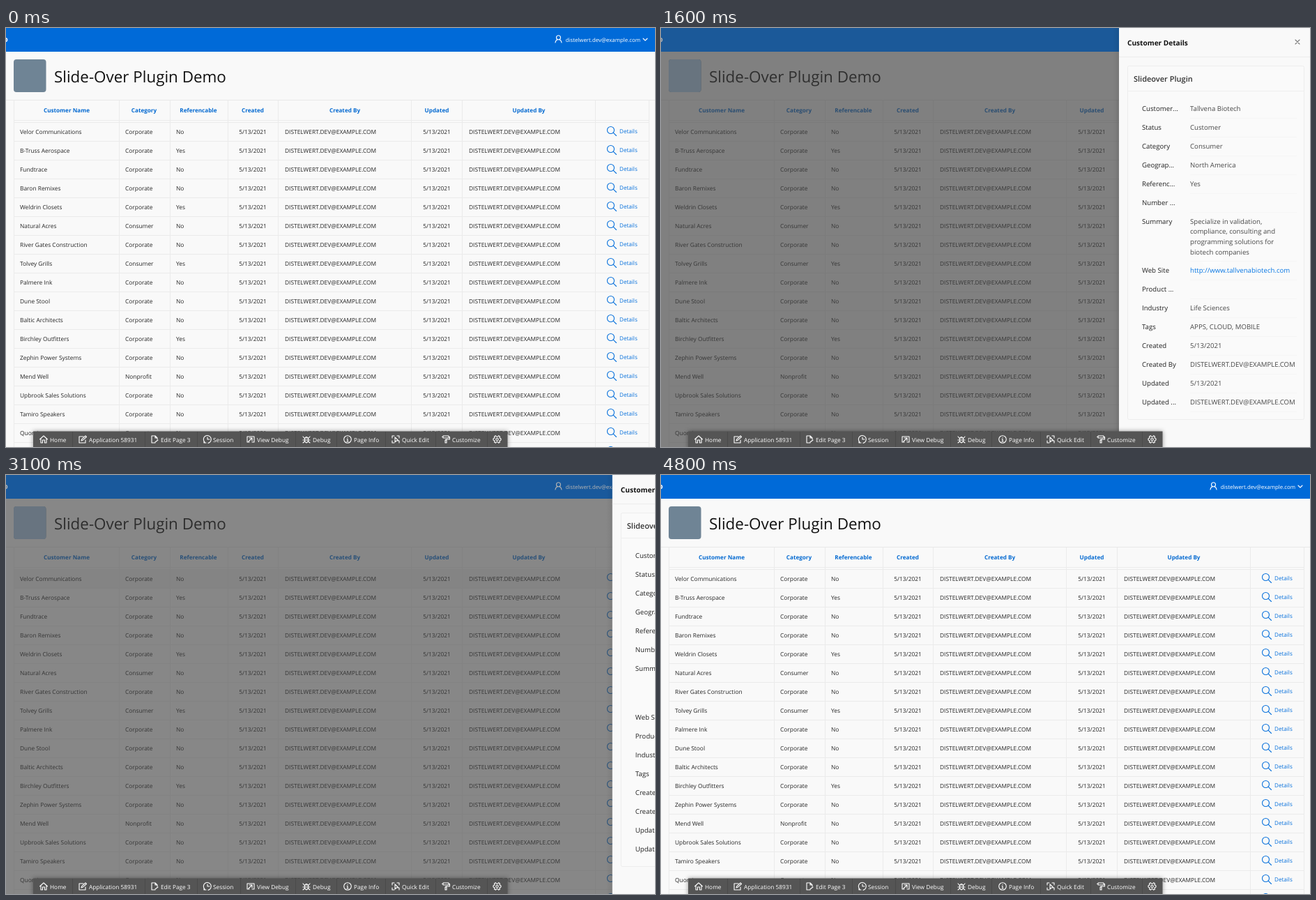
Recreate the animation shown at these times as an HTML page. Size 931 by 601 pixels, loop 5.3 s.

```html
<!DOCTYPE html>
<html lang="en">
<head>
<meta charset="utf-8">
<title>Slide-Over Plugin Demo</title>
<style>
html, body { margin: 0; width: 100%; height: 100%; overflow: hidden; background: #f9f9f9; }
svg { display: block; width: 931px; height: 601px; }
text { font: 8.4px "Open Sans", "Noto Sans", sans-serif; text-rendering: geometricPrecision; white-space: pre; }
.page { fill: #262626; }
.head { font-size: 8.15px; font-weight: 700; fill: #056ad1; text-anchor: middle; }
.link { font-size: 8.1px; fill: #0a72dc; }
.title { font-size: 22.4px; fill: #111; }
.user { font-size: 7.85px; font-weight: 500; fill: #fff; text-anchor: end; }
.tool { font-size: 8.3px; font-weight: 500; fill: #fff; }
.caption { font-size: 10.1px; font-weight: 700; fill: #111; }
.card { font-size: 11px; font-weight: 600; fill: #333; }
.label { font-size: 9.65px; fill: #222; }
.value { font-size: 9.65px; fill: #484848; }
.site { font-size: 9.65px; fill: #0a78e4; }
.mid { text-anchor: middle; }
.icon { fill: none; stroke-width: 1.1; stroke-linecap: round; stroke-linejoin: round; }
</style>
</head>
<body>
<svg id="stage" viewBox="0 0 931 601"></svg>
<script>
const LOOP = 5300, WIDTH = 274, REST = 657, SLIDE = 300, FADE = 100;
const EMAIL = "distelwert.dev@example.com", MAIL = EMAIL.toUpperCase(), DATE = "5/13/2021";

const text = (x, y, s, cls) => `<text x="${x}" y="${y}" class="${cls}">${s}</text>`;
const rect = (x, y, w, h, fill, more = "") =>
  `<rect x="${x}" y="${y}" width="${w}" height="${h}" fill="${fill}" ${more}/>`;
const icon = (x, y, d, color, more = "") =>
  `<path class="icon" transform="translate(${x} ${y})" d="${d}" stroke="${color}" ${more}/>`;
const tile = color => rect(11, 45, 46.5, 47, color, 'rx="4"');

const names = ["Velor Communications", "B-Truss Aerospace", "Fundtrace", "Baron Remixes",
  "Weldrin Closets", "Natural Acres", "River Gates Construction", "Tolvey Grills", "Palmere Ink",
  "Dune Stool", "Baltic Architects", "Birchley Outfitters", "Zephin Power Systems", "Mend Well",
  "Upbrook Sales Solutions", "Tamiro Speakers", "Quorvia", ""];
const consumers = [5, 7], nonprofits = [13], references = [1, 4, 7, 11];

function tableRow(name, i) {
  const y = 152 + i * 27;
  const category = consumers.includes(i) ? "Consumer" : nonprofits.includes(i) ? "Nonprofit" : "Corporate";
  return rect(11, y + 10, 912, 1, "#ebebeb")
    + text(20, y, name, "page")
    + text(171, y, category, "page")
    + text(244, y, references.includes(i) ? "Yes" : "No", "page")
    + text(354, y, DATE, "page mid") + text(400, y, MAIL, "page")
    + text(618, y, DATE, "page mid") + text(664, y, MAIL, "page")
    + icon(867.5, y - 5.5, "M5 0A5 5 0 1 1 -5 0A5 5 0 1 1 5 0M3.6 3.6L8 8", "#0a72dc")
    + text(880, y - 1.5, "Details", "link");
}

function page() {
  const heads = [[87, "Customer Name"], [198, "Category"], [276, "Referencable"], [354, "Created"],
    [486, "Created By"], [618, "Updated"], [750, "Updated By"]];
  const columns = [11, 162, 235, 318, 390, 581, 654, 845, 922];
  return rect(0, 0, 931, 601, "#f9f9f9")
    + rect(0, 0, 931, 34, "#006ad8")
    + `<text x="-4" y="20" style="font-size:11px;font-weight:700" fill="#fff">o</text>`
    + icon(792.5, 16, "M-3 -2.2A3 3 0 1 1 3 -2.2A3 3 0 1 1 -3 -2.2M-4.5 5Q-4 1.4 -1.5 .8M4.5 5Q4 1.4 1.5 .8", "#fff")
    + text(910, 19.5, EMAIL, "user")
    + icon(917, 16.5, "M-3 -1.5L0 1.5L3 -1.5", "#fff")
    + tile("#6f8495")
    + text(69, 78, "Slide-Over Plugin Demo", "title")
    + rect(0, 103, 931, 1, "#e8e8e8")
    + rect(11, 132, 912, 1, "#ebebeb") + rect(11, 135, 912, 1, "#ebebeb")
    + rect(11, 0, 912, 27, "#f0f0f0", 'id="hover"')
    + columns.map(x => rect(x, 104, 1, 497, "#ebebeb")).join("")
    + heads.map(([x, s]) => text(x, 121, s, "head")).join("")
    + names.map(tableRow).join("");
}

// The bar and the tile keep more of their colour than the page.
function shade() {
  return rect(0, 0, 931, 34, "#404040", 'opacity=".42"')
    + rect(0, 34, 931, 567, "#404040", 'opacity=".65"')
    + tile("#68747f");
}

const fields = [["Customer...", "Tallvena Biotech"], ["Status", "Customer"], ["Category", "Consumer"],
  ["Geograp...", "North America"], ["Referenc...", "Yes"], ["Number ...", ""],
  ["Summary", "Specialize in validation,|compliance, consulting and|programming solutions for|biotech companies"],
  ["Web Site", "http://www.tallvenabiotech.com"], ["Product ...", ""], ["Industry", "Life Sciences"],
  ["Tags", "APPS, CLOUD, MOBILE"], ["Created", DATE], ["Created By", MAIL],
  ["Updated", DATE], ["Updated ...", MAIL]];

// Coordinates are relative to the panel's left edge.
function panel() {
  let y = 118.7, body = "";
  for (const [label, value] of fields) {
    const lines = value.split("|");
    body += text(33, y, label, "label");
    lines.forEach((s, i) => body += text(102, y + i * 14.6, s, label == "Web Site" ? "site" : "value"));
    y += 27 + (lines.length - 1) * 14.55;
    body += rect(102, Math.round(y - 17), 153, 1, "#f5f5f5");
  }
  return rect(-9, 0, 9, 601, "url(#edge)")
    + rect(0, 0, WIDTH, 601, "#f9f9f9")
    + rect(0, 41, WIDTH, 1, "#ececec")
    + `<rect x="12.5" y="54.5" width="253" height="507" rx="2" fill="#fafafa" stroke="#ededed"/>`
    + rect(13, 90, 252, 1, "#efefef")
    + `<circle id="spot" cy="325.5" r="17.5" fill="#fff"/>`
    + text(12, 24.5, "Customer Details", "caption")
    + text(21, 76.5, "Slideover Plugin", "card")
    + body
    + `<rect id="ring" x="247" y="11" width="17.5" height="18" rx="4" fill="#fff" stroke="#0a6fd6" stroke-width="2"/>`
    + icon(256, 20, "M-3 -3L3 3M3 -3L-3 3", "#777", 'id="cross"');
}

const tools = [
  [54, 63, "Home", "M-5.5 0L0 -5L5.5 0M-4 -1V5H-1.5V1H1.5V5H4V-1"],
  [110, 119, "Application 58931", "M1 -4H-5V5H4V1M-2 2L-1.3 -.2L4 -5L5.5 -3.5L0 1.3Z"],
  [213, 222, "Edit Page 3", "M1 5H-4V-5H1L4 -2V0M1 -5V-2H4M1 4L5 1"],
  [289, 297, "Session", "M-4 4A5.5 5.5 0 1 1 1 5.4M0 -3V0H3M-5 2V5H-2"],
  [351, 360, "View Debug", "M-2 4H-5V-4H5V4H2M-2 -2H2V2M2 -2L-3 3"],
  [431, 440, "Debug", "M-2.5 -2H2.5V3L0 5L-2.5 3ZM-2 -2Q0 -5 2 -2M-5 -4L-2.5 -1M5 -4L2.5 -1M-5 1H5M-5 5L-2.5 3M5 5L2.5 3"],
  [490, 499, "Page Info", "M5.3 0A5.3 5.3 0 1 1 -5.3 0A5.3 5.3 0 1 1 5.3 0M0 -2.8V-2.5M-.8 -.5H0V3M-1 3H1"],
  [559, 568, "Quick Edit", "M-5 -2V-5H-2M2 -5H5V-2M-5 2V5H-2M5 2V5M-1 -3V4L1 2H4Z"],
  [631, 640, "Customize", "M-4 -5H4V-2H-4ZM4 -3.5H5.5V0H0V1M-1 1H1V5H-1ZM-4 -3.5H-5.5"],
  [704.5, 0, "", "M-2 -5.2L-1 -3.8H1L2 -5.2L4 -4L3.5 -2L5.5 -1V1L3.5 2L4 4L2 5.2L1 3.8H-1L-2 5.2L-4 4L-3.5 2L-5.5 1V-1L-3.5 -2L-4 -4ZM1.7 0A1.7 1.7 0 1 1 -1.7 0A1.7 1.7 0 1 1 1.7 0"]];

function toolbar() {
  const gaps = [95, 199, 274, 336, 415, 474, 544, 616, 690];
  return rect(39, 578.5, 680.5, 26, "#555", 'style="filter:drop-shadow(0 0 3px rgba(0,0,0,.4))"')
    + gaps.map(x => rect(x, 579, 1, 22, "#4a4a4a")).join("")
    + tools.map(([x, tx, s, d]) => icon(x, 590, d, "#fff") + text(tx, 593.5, s, "tool")).join("");
}

const $ = id => document.getElementById(id);
const set = (id, attrs) => Object.entries(attrs).forEach(([k, v]) => $(id).setAttribute(k, v));

$("stage").innerHTML = `<defs><linearGradient id="edge">
  <stop stop-opacity="0"/><stop offset="1" stop-opacity=".07"/></linearGradient></defs>`
  + page() + `<g id="dim">${shade()}</g><g id="panel">${panel()}</g>` + toolbar();

const clamp = p => Math.max(0, Math.min(1, p));
const swing = p => (1 - Math.cos(Math.PI * clamp(p))) / 2;
const visits = [{ open: 897, close: 2180 }, { open: 3006, close: 4380 }];

function draw(now) {
  const t = Math.floor(now % LOOP / 100) * 100;
  const { open, close } = visits[t < 2700 ? 0 : 1];
  const shown = swing((t - open) / SLIDE) - swing((t - close) / SLIDE);
  const x = REST + WIDTH * (1 - shown);
  const active = t >= open - 10 && t < close + SLIDE;
  set("panel", { transform: `translate(${x} 0)`, visibility: active ? "visible" : "hidden" });
  set("dim", { opacity: t < close + 60 ? clamp((t - open) / FADE) : 0 });

  const row = t >= 900 && t < 1400 ? 3 : t >= 3000 && t < 3400 ? 0 : -1;
  set("hover", { y: 135 + row * 27, opacity: row < 0 ? 0 : 1 });

  const spot = t < 1500 || t >= 2500 ? 0 : t >= 1600 && t < 2200 ? 0.4 : 1;
  set("spot", { cx: 789.5 - x, opacity: spot });
  set("ring", { opacity: t >= 4300 ? 1 : 0 });
  set("cross", { stroke: t >= 4100 ? "#111" : "#777" });
}

function tick() {
  draw(performance.now());
  requestAnimationFrame(tick);
}
tick();
</script>
</body>
</html>
```
